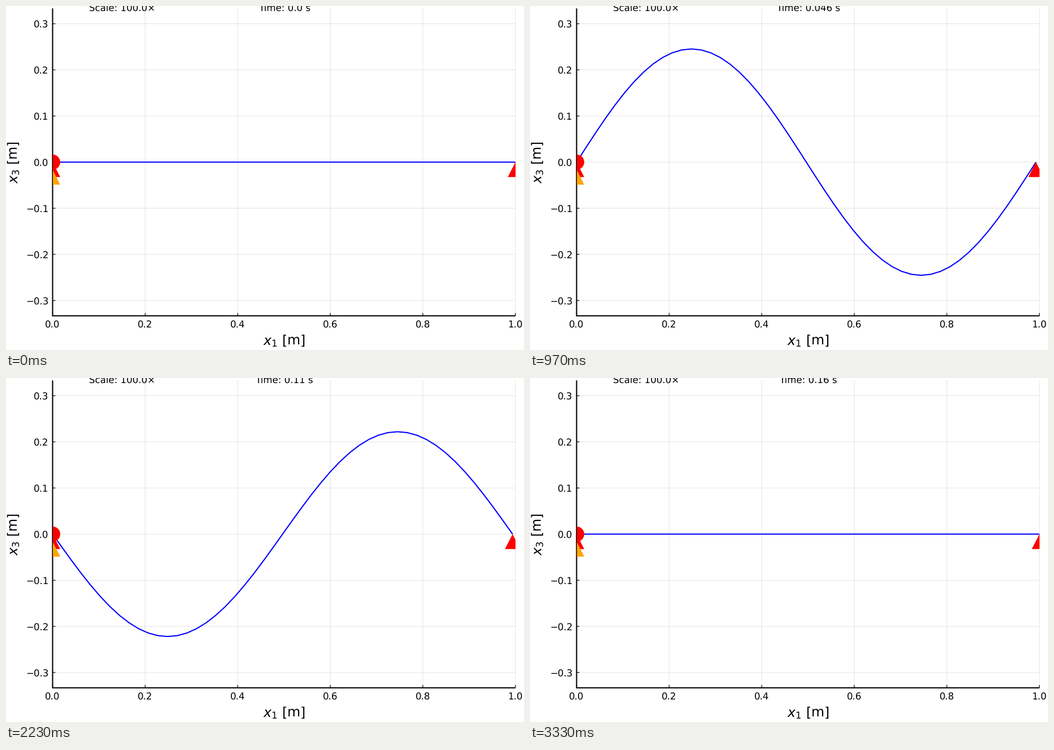
Animation of 917 by 611 pixels, one loop 3.36 s. Source, as a matplotlib script:

```python
import numpy as np
import matplotlib.pyplot as plt
from matplotlib.animation import FuncAnimation
from matplotlib.patches import Circle, Polygon, Rectangle

W, H, DPI = 917, 611, 64
PT = 72 / DPI                       # points per pixel
LEFT, RIGHT, TOP, BOTTOM = 82.5, 901.8, 4.3, 550.3
UNIT = RIGHT - LEFT                 # pixels per metre, both axes
MID = (TOP + BOTTOM) / 2

STEP_MS, STEPS = 10, 336
POSES = 100                         # poses per oscillation
OMEGA = 4 * np.pi ** 2
PERIOD = 2 * np.pi / OMEGA
SCALE = 100
AMPLITUDE = 0.1 / OMEGA             # before scaling
SHORTENING = 1.25                   # axial pull-in relative to slope^2 / 2
NODES = np.linspace(0, 1, 49)
MARK = 13.5

plt.rcParams["font.family"] = "DejaVu Sans"
plt.rcParams["mathtext.fontset"] = "dejavusans"
plt.rcParams["text.hinting"] = "none"

fig = plt.figure(figsize=(W / DPI, H / DPI), dpi=DPI, facecolor="white")
ax = fig.add_axes([0, 0, 1, 1])
ax.set_xlim(0, W)
ax.set_ylim(H, 0)
ax.axis("off")


def px(x):
    return LEFT + UNIT * x


def py(y):
    return MID - UNIT * y


def label(x, y, text, size=16.67, **kw):
    kw = {"ha": "center", "va": "baseline", **kw}
    return ax.text(x, y, text, fontsize=size * PT, color="black", **kw)


def stroke(xs, ys, width, color="black", z=2, **kw):
    line, = ax.plot(xs, ys, color=color, lw=width * PT, zorder=z, snap=False,
                    solid_capstyle="butt", solid_joinstyle="miter", **kw)
    return line


def triangle(x, y):
    """Corners of a support marker with its apex at (x, y)."""
    base = y + 2 * MARK - 0.5
    return [(x, y), (x - MARK, base), (x + MARK, base)]


def draw_axes():
    for i in range(6):
        x = px(i / 5)
        stroke([x, x], [TOP, BOTTOM], 1.04, z=1, alpha=0.1)
        stroke([x, x], [BOTTOM, BOTTOM - 5], 1.2)
        label(x, 571, f"{i / 5:.1f}")
    for i in range(-3, 4):
        y = py(i / 10)
        stroke([LEFT, RIGHT], [y, y], 1.04, z=1, alpha=0.1)
        stroke([LEFT, LEFT + 5], [y, y], 1.2)
        text = f"{i / 10:.1f}".replace("-", "\u2212")
        label(75.3, y + 6.2, text, ha="right")
    stroke([LEFT, LEFT, RIGHT], [TOP, BOTTOM, BOTTOM], 2.08)
    label(493, 595, "$x_1$ [m]", 23.8, va="center")
    label(14, 277, "$x_3$ [m]", 23.8, va="center", rotation=90)


def clipped(patch):
    ax.add_patch(patch)
    patch.set_clip_path(frame)
    return patch


def beam(pose):
    """Scaled shape of the second bending mode, with axial shortening."""
    a = AMPLITUDE * np.sin(2 * np.pi * pose / POSES)
    w = a * np.sin(2 * np.pi * NODES)
    pull = SHORTENING * (2 * np.pi * a) ** 2 / 2
    u = -pull * (NODES / 2 + np.sin(4 * np.pi * NODES) / (8 * np.pi))
    return NODES + SCALE * u, SCALE * w


draw_axes()
frame = Rectangle((LEFT, TOP), UNIT, BOTTOM - TOP, transform=ax.transData)

curve = stroke([], [], 2.08, "blue", 3)
curve.set_solid_joinstyle("round")
curve.set_clip_path(frame)

clipped(Polygon(triangle(LEFT, MID), fc="red", lw=0, zorder=4))
roller = clipped(Polygon(triangle(RIGHT, MID), fc="red", lw=0, zorder=4))
clipped(Polygon(triangle(LEFT, MID + MARK), fc="orange", lw=0, zorder=5))
clipped(Circle((LEFT, MID), MARK, fc="red", lw=0, zorder=6))

label(px(0.15), 9.5, f"Scale: {SCALE:.1f}\u00d7")
clock = label(px(0.5) + 0.5, 9.5, "")


def update(step):
    # the picture changes 30 times a second, rounded to 10 ms
    pose = int(0.3 * step + 0.15)
    x, y = beam(pose)
    curve.set_data(px(x), py(y))
    roller.set_xy(triangle(px(x[-1]), MID))
    seconds = float(f"{pose * PERIOD / POSES:.2g}")
    clock.set_text(f"Time: {seconds} s")
    return curve, roller, clock


anim = FuncAnimation(fig, update, frames=STEPS, interval=STEP_MS,
                     repeat=True, repeat_delay=0, blit=False)
plt.show()
```
